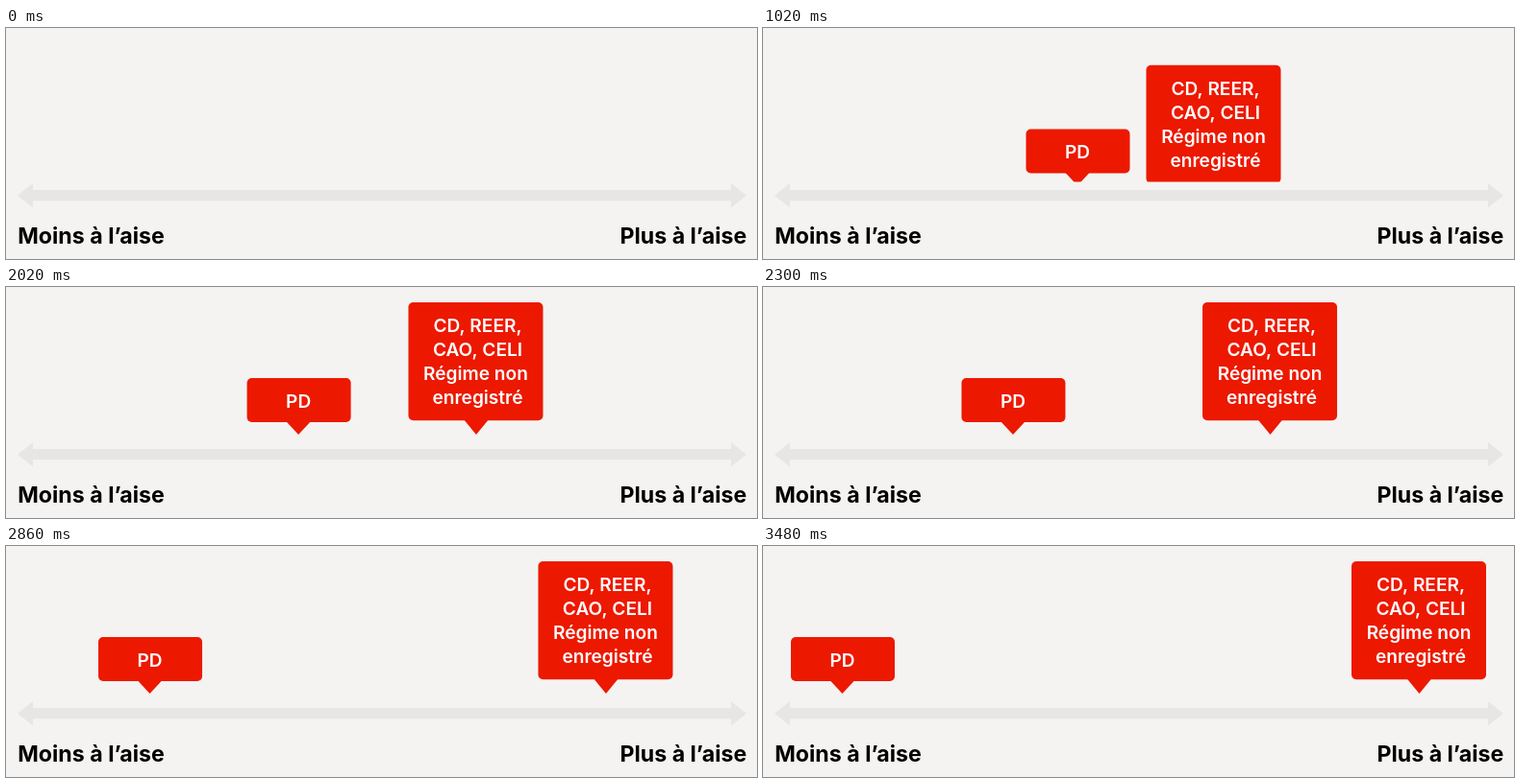
Recreate the animation shown at these times as an HTML page with a canvas. Size 781x241 px, loop 3580 ms.

```html
<!DOCTYPE html>
<html lang="fr">
<head>
<meta charset="utf-8">
<title>Niveau d’aise</title>
<style>
  html, body { margin: 0; width: 100%; height: 100%; overflow: hidden; background: #f4f3f1; }
  canvas { display: block; width: 781px; height: 241px; }
</style>
</head>
<body>
<canvas id="stage"></canvas>
<script>
const W = 781, H = 241, LOOP = 3580, STEP = 20;
const RISE = [420, 1280], SLIDE = [1680, 3480];
const FLOOR = 160.5;
const BG = '#f4f3f1', GREY = '#e7e6e4', RED = '#ed1800';
const FONT = 'Inter, "Open Sans", sans-serif';

// x and endX are left edges; drop is the distance risen
const bubbles = [
  { x: 273.5, endX: 29, y: 95, w: 108, h: 46, drop: 67.5, tip: 53.5,
    lines: [['PD', 53.5, 125.7]] },
  { x: 398.5, endX: 612, y: 16, w: 140, h: 123.3, drop: 147, tip: 70.5,
    lines: [['CD, REER,', 72, 47], ['CAO, CELI', 72, 72],
            ['Régime non', 70, 97], ['enregistré', 72, 122]] }
];

const canvas = document.getElementById('stage');
const ctx = canvas.getContext('2d');
const dpr = window.devicePixelRatio || 1;
canvas.width = W * dpr;
canvas.height = H * dpr;
ctx.scale(dpr, dpr);

const progress = (t, [a, b]) => Math.min(1, Math.max(0, (t - a) / (b - a)));
const easeOut = p => p + p * p - p * p * p;
const easeInOut = p => p * p * (3 - 2 * p);

function polygon(points, color) {
  ctx.fillStyle = color;
  ctx.beginPath();
  points.forEach(([x, y]) => ctx.lineTo(x, y));
  ctx.fill();
}

function text(str, x, y, align, font, color) {
  ctx.font = font + ' ' + FONT;
  ctx.textAlign = align;
  ctx.fillStyle = color;
  ctx.fillText(str, x, y);
}

function drawScale() {
  polygon([[12, 174.7], [28, 162], [28, 169], [754, 169], [754, 162],
           [770, 174.7], [754, 187.5], [754, 180.3], [28, 180.3], [28, 187.5]], GREY);
  const font = '700 23.2px';
  text('Moins à l’aise', 12.2, 225, 'left', font, '#000');
  text('Plus à l’aise', 770.3, 225, 'right', font, '#000');
}

function drawBubble(b, rise, slide) {
  ctx.save();
  ctx.translate(b.x + (b.endX - b.x) * slide, b.drop * (1 - rise));
  ctx.fillStyle = RED;
  ctx.beginPath();
  ctx.roundRect(0, b.y, b.w, b.h, 5);
  ctx.fill();
  const base = b.y + b.h - 0.5;
  polygon([[b.tip - 12.5, base], [b.tip + 12.5, base], [b.tip, 154]], RED);
  b.lines.forEach(([str, x, y]) => text(str, x, y, 'center', '600 19.1px', '#fff'));
  ctx.restore();
}

function draw(t) {
  ctx.fillStyle = BG;
  ctx.fillRect(0, 0, W, H);
  drawScale();
  if (t <= RISE[0]) return;
  const rise = easeOut(progress(t, RISE));
  const slide = easeInOut(progress(t, SLIDE));
  ctx.save();
  ctx.beginPath();
  ctx.rect(0, 0, W, FLOOR);
  ctx.clip();
  bubbles.forEach(b => drawBubble(b, rise, slide));
  ctx.restore();
}

const start = performance.now();
function tick() {
  const t = (performance.now() - start) % LOOP;
  draw(Math.floor(t / STEP) * STEP);
  requestAnimationFrame(tick);
}
tick();
</script>
</body>
</html>
```
